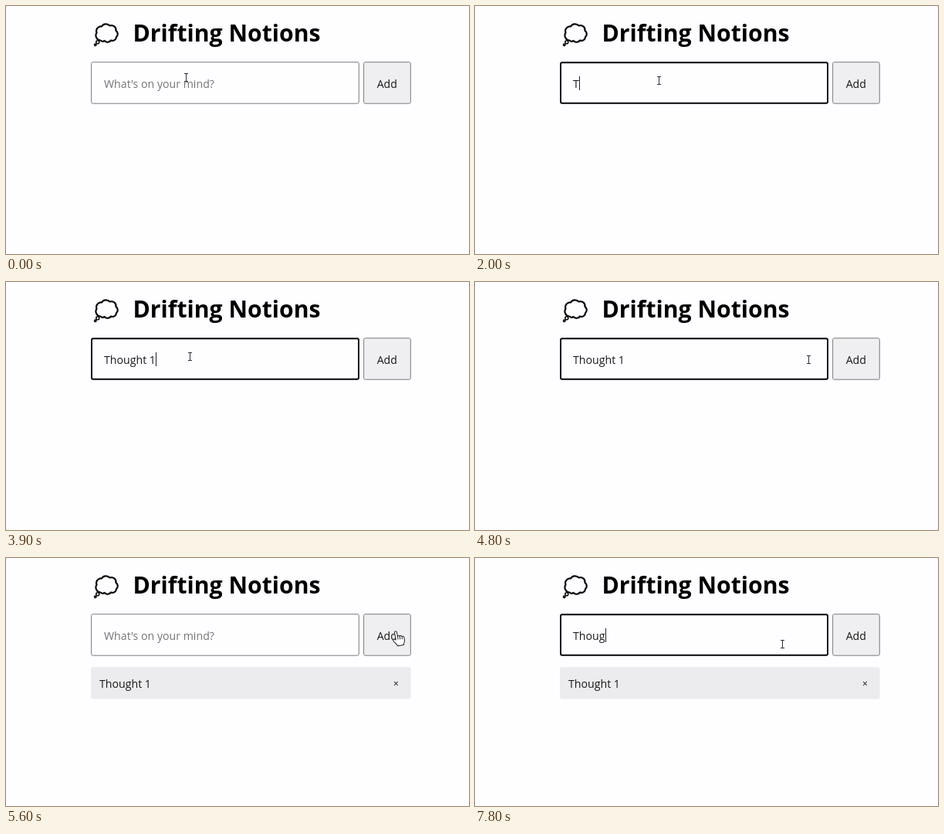
An HTML page for the animation above (8000 ms loop, 600x321 px).

```html
<!DOCTYPE html>
<html lang="en">
<head>
<meta charset="utf-8">
<title>Thought list</title>
<style>
  html, body { margin: 0; width: 100%; height: 100%; overflow: hidden; background: #fefdff; }
  svg { display: block; width: 600px; height: 321px; }
  text { font: 14.15px "Open Sans", "Noto Sans", sans-serif; fill: #1a1a1a; }
  .title { font-size: 30.2px; font-weight: 700; fill: #000; }
  .hint { fill: #757575; }
  .mid { text-anchor: middle; }
  .close { font-size: 12px; }
  .field { fill: #fefdff; stroke: #7c7c7c; }
  .ring { fill: none; stroke: #101014; stroke-width: 2; }
  .button { fill: #efeef0; stroke: #7c7c7c; }
  .item { fill: #ecebed; }
  .cloud { fill: #fefdff; stroke: #0a0a0a; stroke-width: 2.2; stroke-linejoin: round; }
  .dot { fill: #fefdff; stroke: #0a0a0a; stroke-width: 1.6; }
  .beam { fill: none; stroke: #333; }
  .hand { fill: #fff; stroke: #222; stroke-linejoin: round; stroke-linecap: round; }
</style>
</head>
<body>
<svg viewBox="0 0 600 321">
  <path class="cloud" d="M122.500 44.500A6.500 6.500 0 0 1 117.500 34.500A6 6 0 0 1 124 26.500A6.500 6.500 0 0 1 134.500 25.500A6 6 0 0 1 142.500 32A5 5 0 0 1 143 40A5 5 0 0 1 136 44.500A5.500 5.500 0 0 1 127.500 45A4 4 0 0 1 122.500 44.500Z"/>
  <circle class="dot" cx="118.800" cy="46.800" r="2"/>
  <circle class="dot" cx="115.700" cy="50.300" r="1.200"/>
  <text class="title" x="164.500" y="46">Drifting Notions</text>

  <rect class="field" x="110.600" y="72.700" width="346.700" height="53.500" rx="2"/>
  <rect class="ring" id="ring" x="111" y="73.200" width="346" height="52.600" rx="2"/>
  <text class="hint" id="hint" x="127" y="105.700">What's on your mind?</text>
  <text id="typed" x="127" y="105.700" xml:space="preserve"></text>
  <rect id="caret" y="91" width="1" height="18" fill="#222"/>

  <rect class="button" x="463.600" y="72.700" width="60.700" height="53.500" rx="2"/>
  <text class="mid" x="493.800" y="105.700">Add</text>

  <g id="item">
    <rect class="item" x="110" y="141.200" width="414.600" height="41.400" rx="3"/>
    <text x="121" y="168">Thought 1</text>
    <text class="mid close" x="505.500" y="166.500">×</text>
  </g>

  <path class="beam" id="beam" d="M-2.500-5H2.500M0-5V5M-2.500 5H2.500"/>
  <g id="hand">
    <path class="hand" transform="rotate(-10 2 10)" d="M-1.500 11V1.500C-1.500-.5 1.500-.5 1.500 1.500V7C1.800 5.500 4 5.700 4.200 7.300C4.700 6.200 6.700 6.500 6.900 8.100C7.700 7.200 9.500 7.800 9.500 9.500V13C9.500 16 7.700 16.500 7.500 19H-.5C-.8 17-4 14-5 11.300C-5.500 9.500-3.500 9-2.700 10ZM1.500 7V10.500M4.200 7.500V10.800M6.900 8.500V11"/>
  </g>
</svg>
<script>
  const LOOP = 8000, TICK = 100, BLINK = 530;
  const ADDED = 5600;
  const PAUSE = 410; // hesitation after a space

  const sessions = [
    { focus: 240, blur: 5280, start: 2000, gap: 180 },
    { focus: 6100, blur: LOOP, start: 7270, gap: 130 }
  ];
  const moves = [
    { from: 100, to: 300, x: 241, y: 100 },
    { from: 500, to: 600, x: 238, y: 96 },
    { from: 4700, to: 4800, x: 432, y: 100 },
    { from: 4800, to: 5200, x: 506, y: 94 },
    { from: 5600, to: 6000, x: 398, y: 111 }
  ];

  const el = id => document.getElementById(id);
  const [ring, hint, typed, caret, item, beam, hand] =
    ["ring", "hint", "typed", "caret", "item", "beam", "hand"].map(el);
  const show = (node, on) => node.setAttribute("visibility", on ? "visible" : "hidden");
  const ease = u => Math.sin(Math.min(1, Math.max(0, u)) * Math.PI / 2);

  const keys = [..."Thought 1"];
  const keyTime = (s, i) => s.start + i * s.gap + (keys[i - 1] === " " ? PAUSE : 0);

  function pointerAt(t) {
    let x = 233, y = 92;
    for (const m of moves) {
      const u = ease((t - m.from) / (m.to - m.from));
      x += (m.x - x) * u;
      y += (m.y - y) * u;
    }
    return [Math.round(x), Math.round(y)];
  }

  function draw(t) {
    const s = sessions[t < ADDED ? 0 : 1];
    const count = keys.filter((_, i) => t >= keyTime(s, i)).length;
    const text = keys.slice(0, count).join("");
    if (typed.textContent !== text) typed.textContent = text;
    const focused = t >= s.focus && t < s.blur;
    show(hint, !text);
    show(ring, focused);
    show(item, t >= ADDED);

    // The blink restarts at focus and at every key.
    const since = t - (count ? keyTime(s, count - 1) : s.focus);
    const width = count ? typed.getComputedTextLength() : 0;
    caret.setAttribute("x", Math.ceil(127 + width));
    show(caret, focused && Math.floor(since / BLINK) % 2 === 0);

    const [x, y] = pointerAt(t);
    const onButton = x > 463;
    const cursor = onButton ? hand : beam;
    cursor.setAttribute("transform", `translate(${x + 0.5} ${y + 0.5})`);
    show(hand, onButton);
    show(beam, !onButton);
  }

  function tick() {
    const t = performance.now() % LOOP;
    draw(Math.floor(t / TICK) * TICK);
    requestAnimationFrame(tick);
  }
  tick();
</script>
</body>
</html>
```
